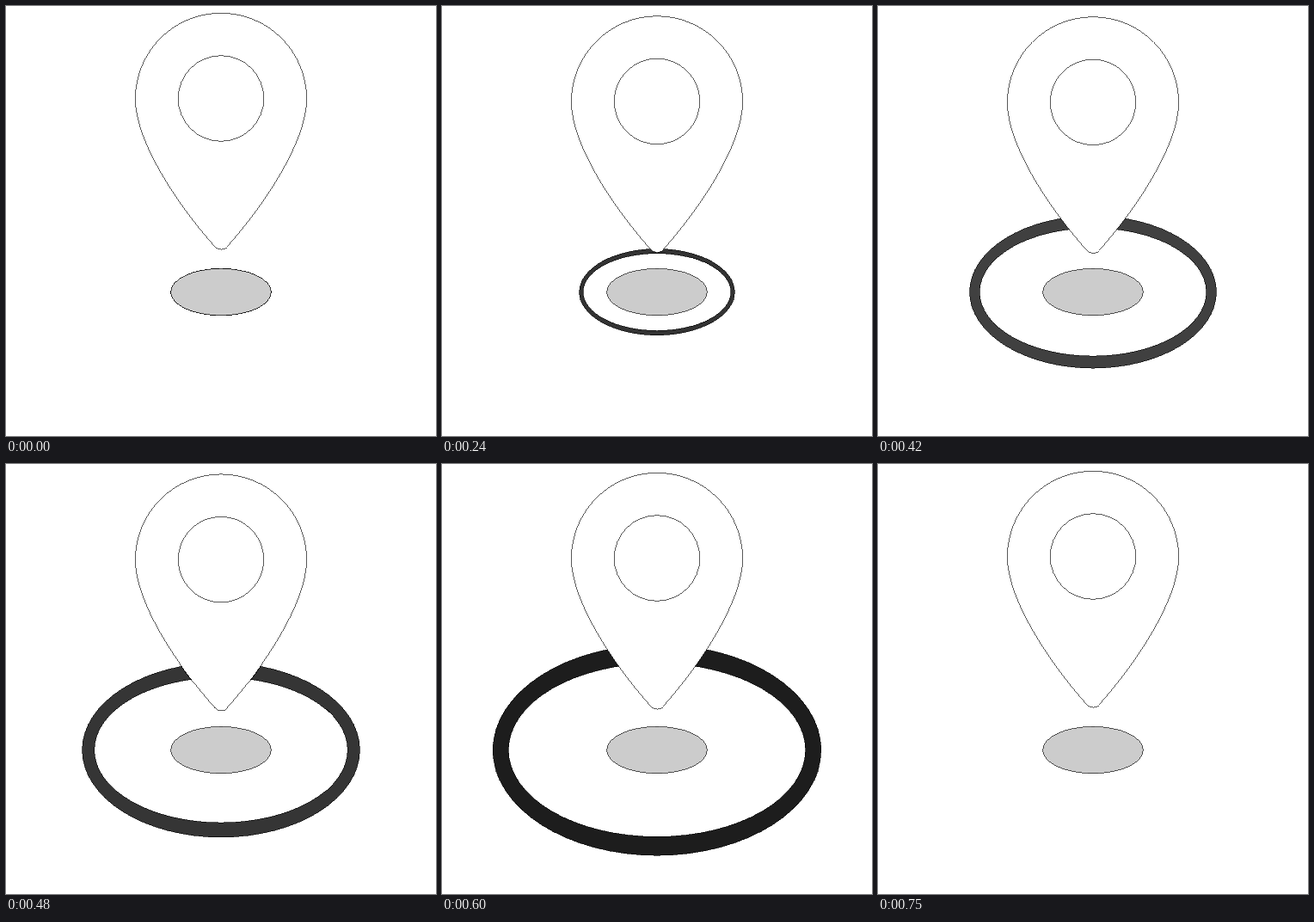
An HTML page that plays this animation: 500x500 px, repeating every 0.81 s.

```html
<!DOCTYPE html>
<html lang="en">
<head>
<meta charset="utf-8">
<title>Map pin</title>
<style>
  @property --f { syntax: "<number>"; inherits: true; initial-value: 0; }

  html, body { margin: 0; width: 100%; height: 100%; overflow: hidden; background: #fff; }

  svg {
    display: block;
    width: 100%;
    height: 100%;
    stroke: #000;
    stroke-width: 0.65;
    shape-rendering: crispEdges;
    animation: tick 810ms infinite;
    /* eased ring growth, and a linear rise and fall */
    --grow: calc((1 - cos(max(0, var(--f) - 0.333) * 7.2deg)) / 2);
    --bob: min(var(--f) / 12, (25 - var(--f)) / 13);
    --grey: calc(76 * var(--bob));
  }

  @keyframes tick {
    0% { --f: 0; animation-timing-function: steps(25); }
    92.59%, 100% { --f: 25; }
  }

  .ring { opacity: calc(25 - var(--f)); }
  .outer {
    rx: calc(58.4px + 148.4px * var(--grow));
    ry: calc(27.2px + 106.9px * var(--grow));
    fill: rgb(var(--grey), var(--grey), var(--grey));
  }
  .inner {
    rx: calc(58.4px + 128.2px * var(--grow));
    ry: calc(27.2px + 82.6px * var(--grow));
    fill: #fff;
  }
  .spot { fill: #ccc; }
  .pin { fill: #fff; transform: translateY(calc(5.2px * var(--bob))); }
</style>
</head>
<body>
<svg viewBox="0 0 500 500">
  <g class="ring">
    <ellipse class="outer" cx="250" cy="332.6"/>
    <ellipse class="inner" cx="250" cy="332.6"/>
  </g>
  <ellipse class="spot" cx="250" cy="332.6" rx="58.4" ry="27.2"/>
  <g class="pin">
    <path d="M150.4 107.9A99.6 99.6 0 0 1 349.6 107.9C349.6 158 300 232 257 280Q250 286.6 243 280C200 232 150.4 158 150.4 107.9Z"/>
    <circle cx="250" cy="107.5" r="49.8"/>
  </g>
</svg>
</body>
</html>
```
